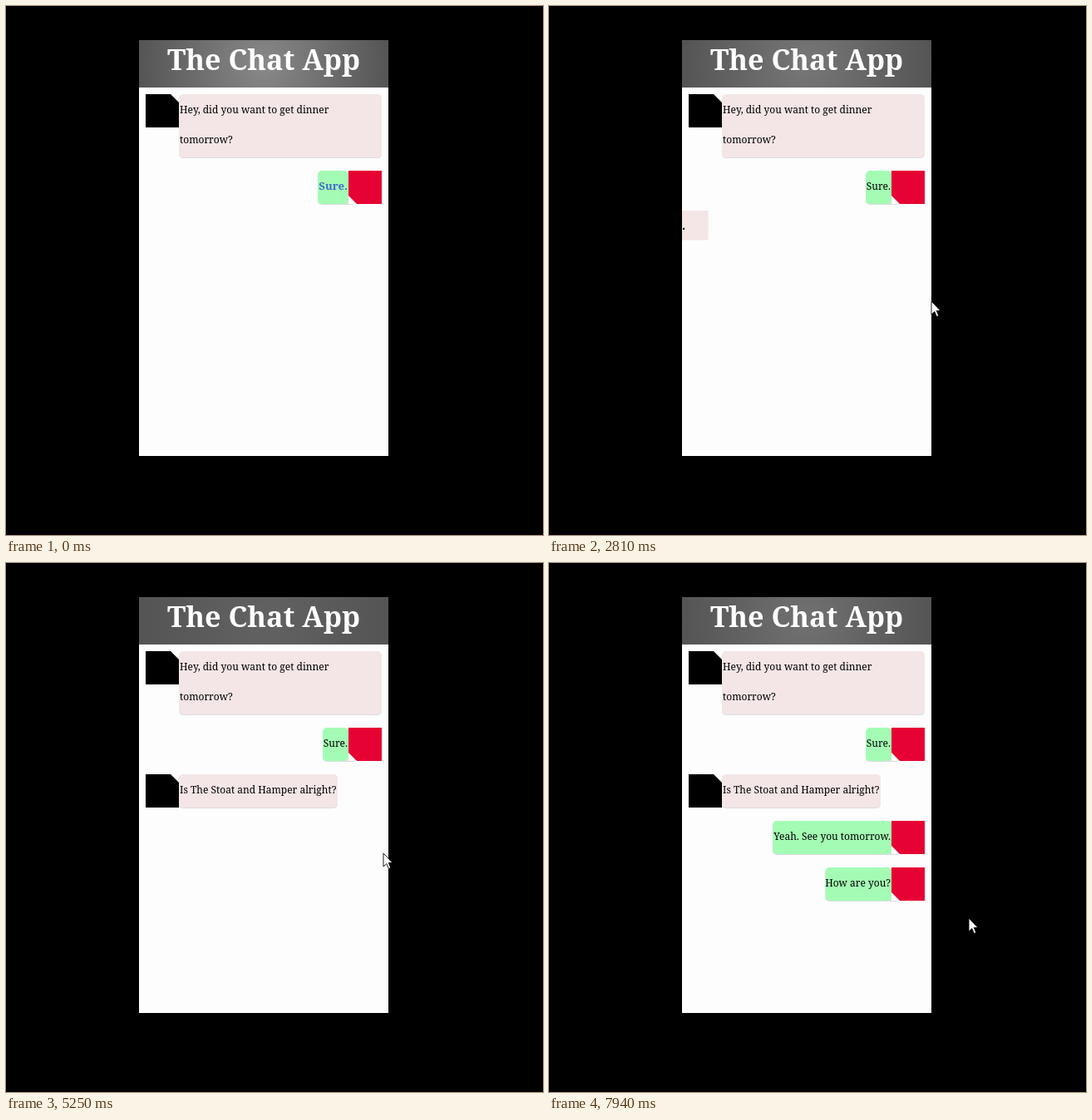
These frames come from a looping animation (646 px wide and 636 px high, 8 s). An HTML page:

```html
<!DOCTYPE html>
<html lang="en">
<head>
<meta charset="utf-8">
<title>Chat</title>
<style>
  html, body { margin: 0; width: 100%; height: 100%; overflow: hidden; background: #000; }
  svg { display: block; width: 646px; height: 636px; }
  text { font-family: "Noto Serif", Georgia, serif; font-size: 12px; }
  .title { font-size: 34.2px; font-weight: 700; fill: #fff; text-anchor: middle; }
  .dots { font-size: 14px; font-weight: 700; }
  .right { text-anchor: end; }
  .hover { font-size: 13.2px; font-weight: 700; fill: #4169c8; }
</style>
</head>
<body>
<svg viewBox="0 0 646 636">
  <defs>
    <radialGradient id="glow" gradientUnits="userSpaceOnUse" cx="310" cy="69.5" r="153">
      <stop id="core"/>
      <stop offset="1" stop-color="#545454"/>
    </radialGradient>
  </defs>
  <rect width="646" height="636"/>
  <rect x="160" y="41" width="300" height="500" fill="#fdfdfd"/>
  <rect x="160" y="41" width="300" height="57" fill="url(#glow)"/>
  <text class="title" x="310" y="77">The Chat App</text>
  <g id="messages"></g>
  <g id="typing">
    <rect x="160" y="246" width="31.5" height="35.5" fill="#f4e6e6"/>
    <text class="dots" x="160" y="269"></text>
  </g>
  <path id="cursor" d="M0 0V16L3.8 12.5 6.4 18.5 8.8 17.5 6.3 11.5H11Z" fill="#fff" stroke="#000" stroke-width=".9"/>
</svg>
<script>
const LOOP = 8000;
const SVG = "http://www.w3.org/2000/svg";
const $ = id => document.getElementById(id);

function add(parent, tag, attrs, text = "") {
  const node = document.createElementNS(SVG, tag);
  for (const name in attrs) node.setAttribute(name, attrs[name]);
  node.textContent = text;
  return parent.appendChild(node);
}

// Message bubbles

const messages = [
  { y: 106, from: 0, width: 244, lines: ["Hey, did you want to get dinner", "tomorrow?"] },
  { y: 198, from: 0, width: 31, mine: true, lines: ["Sure."] },
  { y: 254, from: 5000, width: 191, lines: ["Is The Stoat and Hamper alright?"] },
  { y: 310, from: 6000, width: 143, mine: true, lines: ["Yeah. See you tomorrow."] },
  { y: 366, from: 7000, width: 79.5, mine: true, lines: ["How are you?"] }
];

for (const m of messages) {
  const { y, width, mine, lines } = m;
  const height = 4 + 36 * lines.length;
  const x = mine ? 412 - width : 208;
  const fill = mine ? "#a4fcb4" : "#f4e6e6";
  m.group = add($("messages"), "g", {});
  m.shadow = add(m.group, "rect", { x, y: y + 1, width: width + (mine ? 10 : 0), height, rx: 5, fill: "#dcdce0" });
  m.bubble = add(m.group, "rect", { x, y, width, height, rx: 5, fill });
  add(m.group, "rect", { x: mine ? 412 : 168, y, width: 40, height: 40, fill: mine ? "#e60233" : "#000" });
  add(m.group, "path", {
    d: mine ? `M412 ${y + 30}v10h10z` : `M198 ${y}h10v10z`,
    fill: "#fdfdfd"
  });
  m.texts = lines.map((line, i) => add(m.group, "text", {
    x: mine ? 411 : 209, y: y + 23 + 36 * i, class: mine ? "right" : ""
  }, line));
}

function setHover(m, on) {
  const width = m.width + (on ? 6 : 0);
  m.texts[0].setAttribute("class", on ? "right hover" : "right");
  for (const box of [m.shadow, m.bubble]) box.setAttribute("x", 412 - width);
  m.shadow.setAttribute("width", width + 10);
  m.bubble.setAttribute("width", width);
}

// Pulsing header glow

function drawGlow(t) {
  const gray = Math.round(146 + 49 * Math.cos((t - 840) * Math.PI / 1500));
  $("core").setAttribute("stop-color", `rgb(${gray},${gray},${gray})`);
}

// Pointer path: time, x, y

const path = [
  [200, 440, 262], [480, 497, 335], [880, 469, 353], [1080, 460, 355],
  [4960, 460, 355], [5120, 454, 349], [5690, 454, 349], [5950, 494, 355],
  [7340, 494, 355], [7800, 505, 427], [LOOP, 505, 427]
];

function drawCursor(t) {
  const visible = t >= path[0][0];
  $("cursor").style.display = visible ? "" : "none";
  if (!visible) return;
  const i = Math.max(1, path.findIndex(([at]) => at >= t));
  const [t0, x0, y0] = path[i - 1], [t1, x1, y1] = path[i];
  const p = (t - t0) / (t1 - t0);
  const ease = p * p * (3 - 2 * p);
  $("cursor").setAttribute("transform", `translate(${x0 + (x1 - x0) * ease} ${y0 + (y1 - y0) * ease})`);
}

function draw(now) {
  const t = now % LOOP;
  drawGlow(t);
  drawCursor(t);
  setHover(messages[1], t < 200);
  for (const m of messages) m.group.style.display = t >= m.from ? "" : "none";
  $("typing").style.display = t >= 2000 && t < 5000 ? "" : "none";
  $("typing").lastElementChild.textContent = ".".repeat(Math.max(0, Math.floor(t / 1000) - 1));
}

const start = performance.now();
function tick() {
  draw(performance.now() - start);
  requestAnimationFrame(tick);
}
tick();
</script>
</body>
</html>
```
